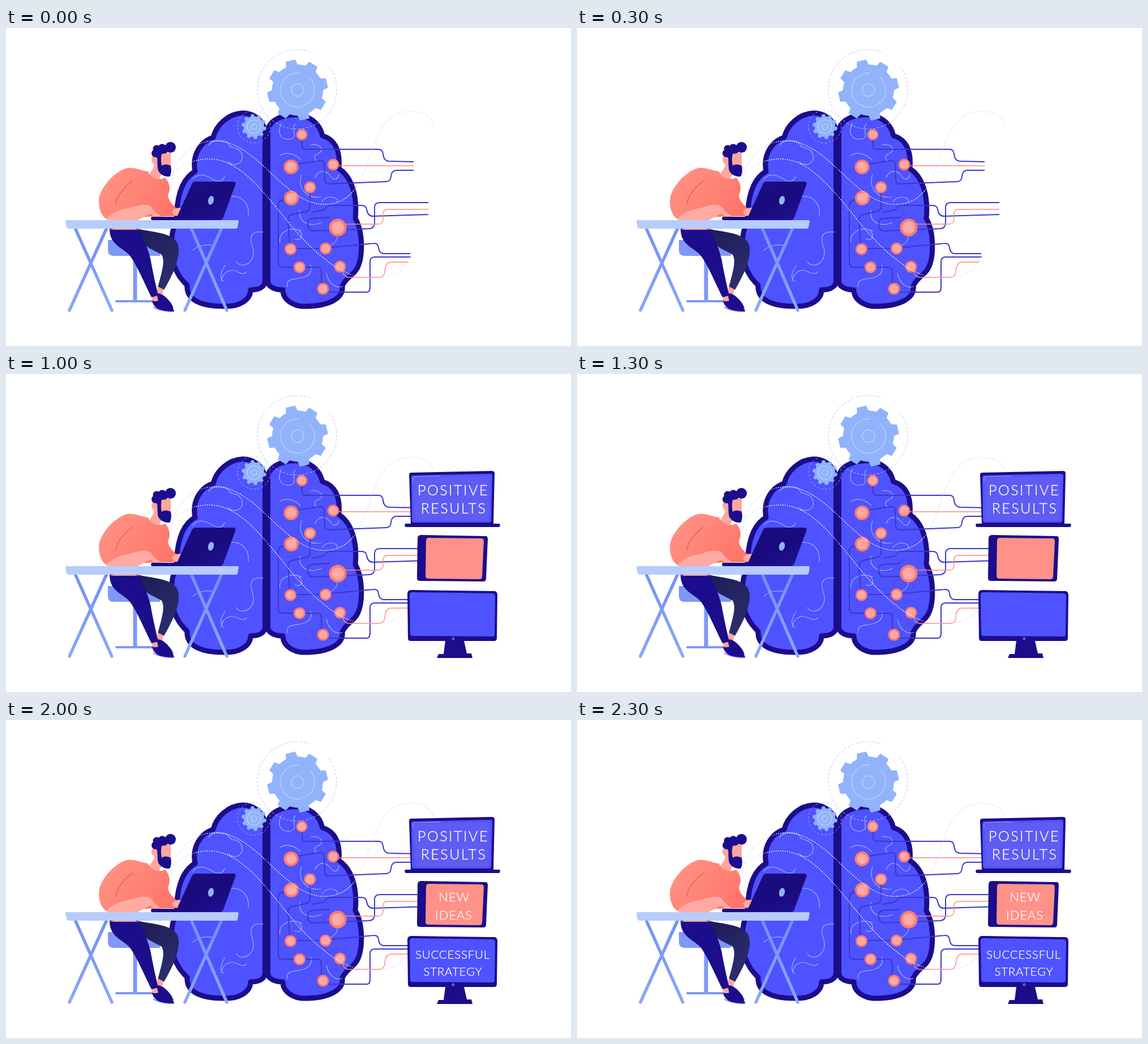
An HTML page that plays this animation: 998x561 px, repeating every 2.5 s.

```html
<!DOCTYPE html>
<html lang="en">
<head>
<meta charset="utf-8">
<title>Brain and devices</title>
<style>
html, body { margin: 0; width: 100%; height: 100%; overflow: hidden; background: #fff; }
svg { display: block; width: 998px; height: 561px; }
.line { fill: none; stroke-linecap: round; stroke-linejoin: round; }
.fold { stroke: #97b2ff; stroke-width: 1.2; }
.wire { stroke: #3b38c6; stroke-width: 2; stroke-linecap: butt; }
.warm { stroke: #ff897e; stroke-width: 1.4; stroke-linecap: butt; }
.thin { fill: none; stroke: #c3d6ff; stroke-width: 1.1; }
.dash { fill: none; stroke: #b7c5f2; stroke-width: 1; stroke-dasharray: 4 3; }
.dots { fill: none; stroke-width: 1.1; stroke-dasharray: 1.8 2.2; }
.words { fill: #fff; stroke: #fff; stroke-width: .35; font-family: Lato, "Open Sans", sans-serif; font-weight: 300; text-anchor: middle; }
.step { opacity: 0; }
</style>
</head>
<body>
<svg viewBox="0 0 998 561">
  <defs>
    <linearGradient id="shirt" x1="0" y1=".2" x2="1" y2=".7">
      <stop offset="0" stop-color="#ff9485"/><stop offset="1" stop-color="#ff7468"/>
    </linearGradient>
    <linearGradient id="lid" x1="0" y1="0" x2="1" y2="1">
      <stop offset="0" stop-color="#1f0d85"/><stop offset=".6" stop-color="#190b7e"/><stop offset="1" stop-color="#221295"/>
    </linearGradient>
    <linearGradient id="farLeg" x1="0" y1="0" x2=".5" y2="1">
      <stop offset="0" stop-color="#1d1c59"/><stop offset="1" stop-color="#2b2d6c"/>
    </linearGradient>
    <linearGradient id="metal" x1="0" y1="0" x2="0" y2="1">
      <stop offset="0" stop-color="#7391f2"/><stop offset="1" stop-color="#8ba8fa"/>
    </linearGradient>
    <path id="left" d="M457.5 446V180C452 161 437 150 418 150C393 151 371 171 366 193C344 200 328 224 334 253C314 264 301 290 301 342C289 362 289 410 303 432C307 441 314 448 320 454C318 480 345 491 385 491C412 492 432 480 432 462C445 462 457.500 458 457.500 446Z"/>
    <path id="right" d="M462.5 446V180C466 162 488 153 512 153C536 154 554 168 559 190C580 196 591 215 588 248C610 262 621 295 617 336C631 360 632 412 616 430C609 438 600 442 594 455C597 478 568 491 527 491C508 491 489 480 489 462C477 462 462.500 458 462.500 446Z"/>
    <path id="swirl" d="M293 278C290 240 325 199 369 199C445 199 490 311 562 311C662 311 622 147 716 147C734 147 751 155 755 171"/>
    <path id="drift" d="M300 252C318 237 338 231 359 231C426 231 475 322 530 378C575 422 606 441 645 441C682 441 704 429 713 404"/>
    <clipPath id="inside"><use href="#left"/><use href="#right"/></clipPath>
  </defs>

  <g fill="#4f52ff" stroke="#1b0d8c" stroke-width="9" stroke-linejoin="round">
    <use href="#left"/><use href="#right"/>
  </g>

  <g class="line fold">
    <path d="M358 207C362 197 390 195 394 206C397 215 412 207 417 224C420 240 402 246 392 236"/>
    <path d="M330 267C340 254 355 260 367 268C376 273 384 269 386 262"/>
    <path d="M398 297C420 296 430 313 428 331"/>
    <path d="M454 360C432 357 429 370 436 388C443 414 416 427 407 412"/>
    <path d="M387 419C378 432 377 443 385 447M380 446C384 425 402 426 408 430C418 435 424 433 425 430"/>
    <path d="M330 392C340 383 354 381 366 384"/>
    <path d="M487 168C478 184 484 198 502 196C518 193 502 177 511 169"/>
    <path d="M539 206C556 203 565 217 550 222C543 225 544 233 550 234"/>
    <path d="M484 225C495 217 512 223 520 232"/>
    <path d="M522 259C514 283 532 302 556 298"/>
    <path d="M546 264C552 249 565 250 574 262C580 270 586 267 588 258"/>
    <path d="M586 307C586 296 566 295 558 306"/>
    <path d="M519 321C516 346 540 351 557 343"/>
    <path d="M484 378C480 361 502 349 522 358"/>
    <path d="M510 372C522 377 527 365 517 357"/>
    <path d="M573 384C584 378 587 371 585 362"/>
    <path d="M497 457C493 441 510 444 525 440C537 436 541 428 538 418"/>
    <path d="M566 433C570 451 583 460 594 456"/>
  </g>

  <g class="line wire">
    <path d="M523 196V207Q523 214 530 214H658Q665 214 666 222Q667 234 676 235L720 236"/>
    <path d="M515 240L554 234Q562 233 562 241L563 268Q563 276 571 275L672 271Q679 271 680 262Q681 251 690 251H720"/>
    <path d="M537 290V314Q537 323 529 324L505 329Q498 331 498 338L501 380"/>
    <path d="M492 303Q481 304 481 313V414Q481 422 489 422H508"/>
    <path d="M540 325L557 322Q564 321 565 317Q567 313 575 313H628Q636 313 637 320Q639 332 648 332L746 329"/>
    <path d="M572 334L541 336Q532 337 533 346Q533 358 543 358L642 354Q651 353 651 344V317Q651 308 660 308H746"/>
    <path d="M512 389H556M575 387L649 380Q657 379 658 387Q659 398 668 398H714"/>
    <path d="M528 422H549Q557 422 557 430V451M570 466H635Q643 467 643 458V413Q643 404 651 404H715"/>
  </g>
  <g class="line warm">
    <path d="M587 243H720"/>
    <path d="M600 346H657Q665 346 666 338V328Q666 320 674 320H746"/>
    <path d="M595 430Q597 440 606 440H659Q668 439 669 431Q670 413 680 413H711"/>
  </g>
  <g id="nodes"></g>

  <g id="gears" fill="#91b3fb"></g>
  <g class="dash">
    <path d="M571 67.500A70 70 0 1 1 537 42"/>
    <circle cx="438" cy="174" r="29" opacity=".75"/>
  </g>
  <g class="thin">
    <circle cx="515" cy="109.500" r="11"/>
    <path d="M536 88A30 30 0 1 1 517 79.500"/>
    <circle cx="438" cy="174" r="5"/>
    <circle cx="438" cy="174" r="12"/>
  </g>

  <g class="dots" stroke="#d6cdf3"><use href="#swirl"/><use href="#drift"/></g>
  <g class="dots" stroke="#fff" clip-path="url(#inside)"><use href="#swirl"/><use href="#drift"/></g>

  <!-- stool -->
  <path fill="#7f98f8" d="M180 374H262Q272 385 272 402H190Q180 402 180 391Z"/>
  <path fill="none" stroke="#7f98f8" stroke-width="7" d="M228 400V482"/>
  <path class="line" stroke="#7f98f8" stroke-width="4" d="M195 482H266"/>

  <!-- man -->
  <path fill="url(#farLeg)" d="M232 354C255 360 291 360 302 378C311 395 300 427 279 462L268 458C274 434 282 412 275 400C262 392 240 386 234 366Z"/>
  <path fill="#ffa69d" d="M268 456L278 461L275 474L266 470ZM257 472L268 471L269 482L259 484Z"/>
  <path fill="#1b0d8c" d="M266 468C277 467 286 478 292 486L296 494L270 487Z"/>
  <path fill="#1b0d8c" d="M183 353H232C244 372 254 396 257 417C261 438 265 456 269 472L257 475C244 449 231 418 219 402C209 388 182 384 183 353Z"/>
  <path fill="#1b0d8c" d="M258 481C266 484 271 479 276 481C285 486 296 491 297 500C285 502 261 499 258 481Z"/>
  <path fill="none" stroke="#5a5cff" stroke-width="1.300" d="M260 492C268 498 283 500 297 500"/>

  <path fill="#ffa69d" d="M257 232C257 224 266 221 270 230L274 220H291V243L272 262L270 272L250 262C257 252 262 246 262 240Q257 238 257 232Z"/>
  <g fill="#1b0d8c">
    <circle cx="266" cy="213" r="6.500"/><circle cx="264" cy="221" r="7"/>
    <circle cx="276" cy="212" r="7.500"/><circle cx="290.500" cy="210.500" r="9.500"/>
    <path d="M266 207L290 213L283 221L275 222C273 231 274 238 275 243C281 239 287 241 291 243C293 252 291 260 289 262C281 263 273 259 269 252C267 245 268 238 267 229L262 226Z"/>
  </g>
  <path fill="url(#shirt)" d="M251 253C254 264 270 270 281 264C289 272 291 284 287 292C284 299 290 310 304 320L298 332H270L177 337C166 329 162 312 165 297C171 277 192 253 214 247C227 245 240 252 251 253Z"/>
  <path class="line" stroke="#d95d5f" stroke-width="1.200" d="M223 270C211 280 196 293 194 311"/>
  <path fill="#ffaaa2" d="M177 337C184 328 200 320 216 318C236 311 250 309 257 316C260 324 270 329 278 335L262 334L257 328C249 328 241 336 232 339H181ZM293 324C297 318 304 316 310 318L306 332L297 331Z"/>
  <path fill="#ff9c92" d="M183 356H236L228 354H190Z"/>

  <!-- laptop and desk -->
  <path fill="url(#lid)" d="M335 271H402Q407 271 405 277L384 334Q382 339 378 339H259Q256 339 256 336Q256 333 259 333H302L328 276Q330 271 335 271Z"/>
  <ellipse cx="362" cy="304" rx="5" ry="7.800" fill="#8eb2fb" transform="rotate(14 362 304)"/>
  <path class="line" stroke="url(#metal)" stroke-width="5.500" d="M177 355L112 498M123 355L187 498M380 355L316 498M328 355L390 498"/>
  <path fill="#b7ccfb" d="M108 339H409Q411 339 411 341L409 352Q408 354 406 354H111Q108 354 107 352L105 341Q105 339 108 339Z"/>

  <g class="step" data-from="500">
    <!-- notebook -->
    <path fill="#1b0d8c" d="M716 174L858 171Q863 171 863 175L861 264H872Q874 270 870 270H707Q703 270 705 264H715L712 178Q712 174 716 174Z"/>
    <path fill="#5154ff" d="M720 179L855 176Q859 176 859 180L857 258Q857 262 853 262H721Q717 262 717 258L716 183Q716 179 720 179Z"/>
    <path fill="#5f5bf3" d="M725 183L850 180Q854 180 854 184L853 258H722L720 187Q720 183 725 183Z"/>
    <path class="line" stroke="#8c92ff" stroke-width="1.200" d="M719 190V185Q719 181 723 181L767 180"/>
    <!-- tablet -->
    <path fill="#1b0d8c" d="M733 284L847 286Q851 286 851 291L848 361Q848 366 843 366L731 365Q726 365 726 360L727 290Q727 284 733 284Z"/>
    <path fill="#ff9188" d="M747 289L839 290Q844 290 844 295L841 357Q841 362 836 362L746 361Q741 361 741 356L742 294Q742 289 747 289Z"/>
    <!-- monitor -->
    <path fill="#1b0d8c" d="M716 381L863 383Q868 384 868 390L867 466Q867 471 862 471H809L814 493H822L824 501H761L764 494H773L776 471H715Q710 471 710 466L709 388Q709 381 716 381Z"/>
    <path fill="#4f52ff" d="M718 385L860 387Q864 388 864 392L863 459Q863 463 859 463L718 462Q714 462 714 458L713 390Q713 385 718 385Z"/>
    <circle cx="790" cy="467" r="1.800" fill="none" stroke="#a9bdff"/>
  </g>
  <g class="step words" data-from="1000" font-size="25" letter-spacing="2.500">
    <text x="790" y="214">POSITIVE</text><text x="791" y="245.500">RESULTS</text>
  </g>
  <g class="step words" data-from="1500" font-size="20.500" letter-spacing=".8">
    <text x="789" y="420.500">SUCCESSFUL</text><text x="789.500" y="450.500">STRATEGY</text>
  </g>
  <g class="step words" data-from="2000" font-size="22" letter-spacing=".9">
    <text x="791.500" y="319.500">NEW</text><text x="791" y="352">IDEAS</text>
  </g>
</svg>
<script>
const LOOP = 2500;

function add(parent, tag, attrs) {
  const el = document.createElementNS('http://www.w3.org/2000/svg', tag);
  for (const k in attrs) el.setAttribute(k, attrs[k]);
  document.getElementById(parent).appendChild(el);
}

// Each tooth: root, tip, tip, root, at angles relative to its centre.
function gear(cx, cy, root, tip, teeth, turn) {
  const pitch = 360 / teeth, pts = [];
  for (let i = 0; i < teeth; i++) {
    for (const [r, a] of [[root, -.3], [tip, -.2], [tip, .2], [root, .3]]) {
      const t = (turn + (i + a) * pitch) * Math.PI / 180;
      pts.push((cx + r * Math.cos(t)).toFixed(1) + ' ' + (cy + r * Math.sin(t)).toFixed(1));
    }
  }
  add('gears', 'path', { d: 'M' + pts.join('L') + 'Z' });
  add('gears', 'circle', { cx, cy, r: root });
}

gear(515, 109.5, 45, 54, 8, -13.5);
gear(438, 174, 18, 22, 10, 10);

const nodes = [
  [522.5, 188, 10], [503.5, 245, 13], [578, 241, 10.5], [537, 281, 10.5],
  [504, 300, 13], [586, 352, 15.5], [502.5, 390, 10.5], [564.5, 389, 10.5],
  [518.5, 422, 10.5], [590, 421, 10.5], [560, 460, 10.5]
];
for (const [cx, cy, r] of nodes) {
  add('nodes', 'circle', { cx, cy, r, fill: '#ff7b6f' });
  add('nodes', 'circle', { cx, cy, r: r * .7, fill: '#ffaaa6' });
}

const steps = [...document.querySelectorAll('.step')];
function draw() {
  const t = performance.now() % LOOP;
  for (const el of steps) el.style.opacity = t >= +el.dataset.from ? 1 : 0;
  requestAnimationFrame(draw);
}
draw();
</script>
</body>
</html>
```
